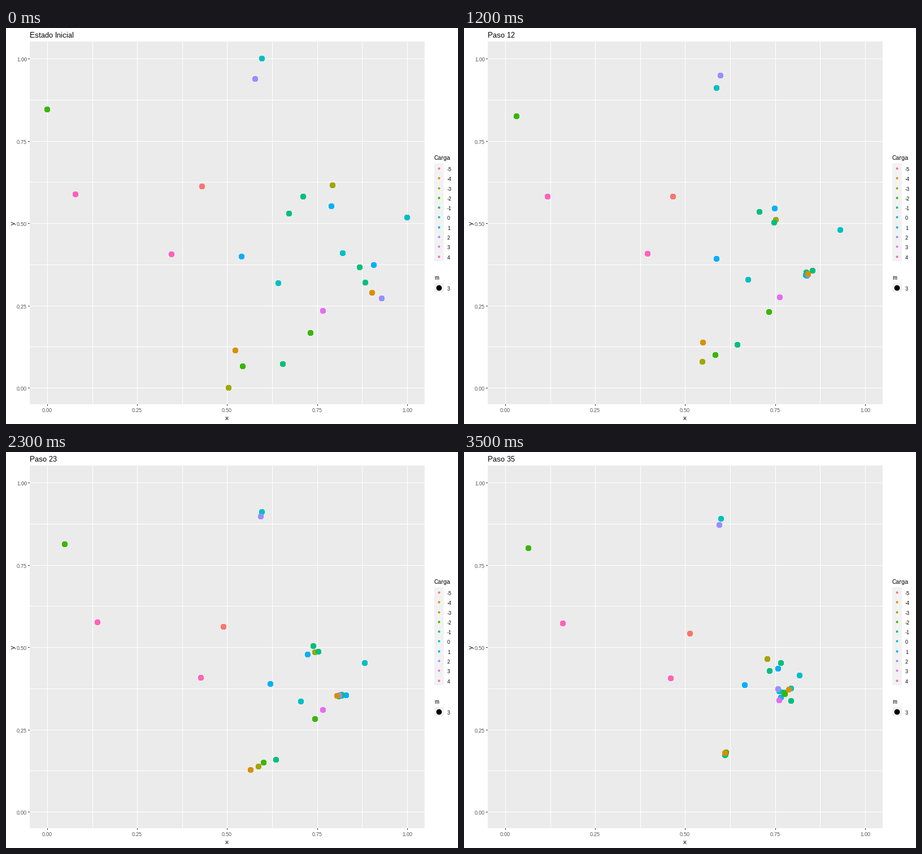
A matplotlib script for the animation above (3600 ms loop, 800 by 700 pixels).

```python
import numpy as np
import matplotlib.pyplot as plt
from matplotlib.animation import FuncAnimation
from matplotlib.patches import Rectangle

W, H = 800, 700
STEPS = 36
PT = 0.72  # points per pixel at 100 dpi

HUES = ("#F8766D", "#D89000", "#A3A500", "#39B600", "#00BF7D",
        "#00BFC4", "#00B0F6", "#9590FF", "#E76BF3", "#FF62BC")
CHARGES = range(-5, 5)
COLOR = dict(zip(CHARGES, HUES))

# Data (0, 0) and the extent of one data unit, in pixels
ORIGIN = np.array([73, 636])
UNIT = np.array([637, -582])

# Starting pixel positions by charge, in drawing order
START = {
    -5: [(347, 280)],
    4: [(123, 294), (293, 400)],
    -3: [(578, 278), (394, 636)],
    0: [(453, 54), (482, 451), (596, 398), (710, 335)],
    1: [(417, 404), (576, 315), (651, 419)],
    -1: [(501, 328), (526, 298), (490, 594), (636, 450), (626, 423)],
    2: [(441, 90), (665, 478)],
    -2: [(73, 144), (419, 598), (539, 539)],
    -4: [(406, 570), (648, 468)],
    3: [(561, 500)],
}

PULL = 0.00255    # attraction summed over the whole run
MAX_STEP = 0.02   # longest move per step and axis
SOFT = 1e-6


def simulate(p):
    """Every particle attracts every other with a force of 1 / distance."""
    spent = PULL * (np.arange(STEPS) / (STEPS - 1)) ** (2 / 3)
    path = [p]
    for gain in np.diff(spent):
        gap = p[None, :] - p[:, None]
        dist2 = (gap ** 2).sum(axis=2, keepdims=True) + SOFT
        force = (gap / dist2).sum(axis=1)
        p = p + np.clip(gain * force, -MAX_STEP, MAX_STEP)
        path.append(p)
    return np.array(path)


start = np.array([xy for pts in START.values() for xy in pts])
colors = [COLOR[q] for q, pts in START.items() for _ in pts]
path = np.round(ORIGIN + UNIT * simulate((start - ORIGIN) / UNIT))

plt.rcParams.update({"font.family": "Liberation Sans",
                     "text.hinting": "native", "text.hinting_factor": 1})
fig = plt.figure(figsize=(W / 100, H / 100), dpi=100, facecolor="white")
ax = fig.add_axes([0, 0, 1, 1])
ax.set_xlim(0, W)
ax.set_ylim(H, 0)
ax.axis("off")


def box(x, y, w, h, color):
    ax.add_patch(Rectangle((x, y), w, h, fc=color, lw=0, antialiased=False))


def label(x, y, text, size, color="black", **kw):
    kw.setdefault("va", "baseline")
    return ax.text(x, y, text, fontsize=size * PT, color=color, **kw)


def circles(xy, size, color):
    x, y = np.transpose(xy)
    return ax.scatter(x, y, s=(size * PT) ** 2, c=color, linewidths=0,
                      antialiased=False, zorder=3)


# Panel, grid and axes
box(42, 24, 699, 641, "#EBEBEB")
for i in range(9):
    v = i / 8
    gx, gy = int(73.4 + 637 * v), int(636.6 - 582 * v)
    box(gx, 24, 1, 641, "white")
    box(42, gy, 699, 1, "white")
    if i % 2 == 0:
        box(gx, 665, 1, 3, "#333333")
        box(39, gy, 3, 1, "#333333")
        label(gx, 679, f"{v:.2f}", 9, "#4D4D4D", ha="center")
        label(37, gy + 5, f"{v:.2f}", 9, "#4D4D4D", ha="right")
label(391, 693, "x", 11, ha="center")
label(13, 345, "y", 11, ha="center", va="center", rotation=90)

# Legends
label(758, 233, "Carga", 11)
box(758, 239, 17, 173, "#F2F2F2")
for i, q in enumerate(CHARGES):
    cy = round(248 + 17.28 * i)
    circles([(766, cy)], 4, COLOR[q])
    label(781, cy + 5, str(q), 9)
label(758, 445, "m", 11)
box(758, 450, 17, 17, "#F2F2F2")
circles([(766, 459)], 9.8, "black")
label(781, 464, "3", 9)

title = label(42, 17, "", 13)
dots = circles(path[0], 9.8, colors)


def update(k):
    title.set_text(f"Paso {k:02d}" if k else "Estado Inicial")
    dots.set_offsets(path[k])
    return title, dots


anim = FuncAnimation(fig, update, frames=STEPS, interval=100, repeat=True,
                     repeat_delay=0, blit=False)
plt.show()
```
